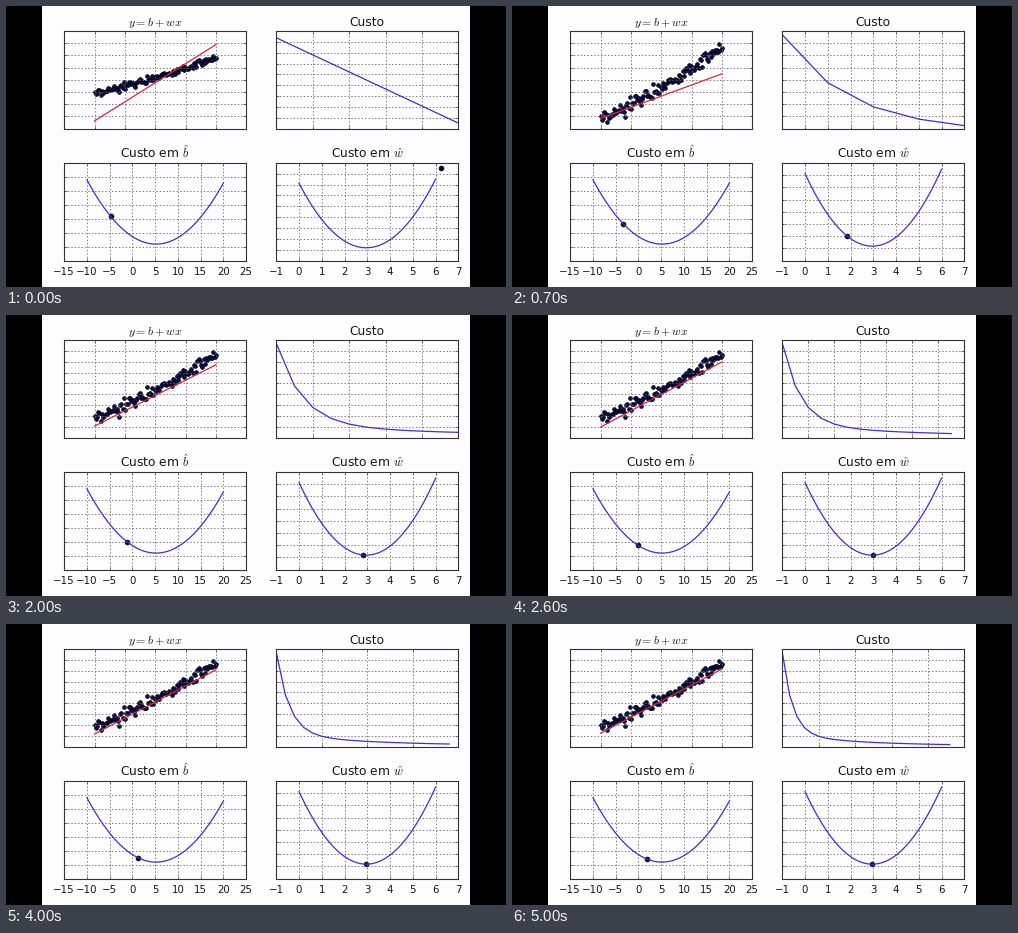
These frames come from a looping animation (500x281 px, 5.1 s). A matplotlib script:

```python
import math

import matplotlib.pyplot as plt
import numpy as np
from matplotlib.animation import FuncAnimation
from matplotlib.patches import Rectangle

W, H, DPI = 500, 281, 100
FRAMES, INTERVAL = 51, 100
STEP_MS, LEAD_MS = 225, 112     # pace of the descent and its head start
PX = 72 / DPI                   # one pixel in points

PAPER, INK, GRID = "#fdfcfe", "#161616", "#6a6a6a"
BLUE, RED, NAVY, BLACK = "#3c32cc", "#d6283c", "#0c0c5a", "#06060e"

plt.rcParams.update({
    "font.family": "DejaVu Sans",
    "mathtext.fontset": "cm",
    "lines.scale_dashes": False,
    "axes.axisbelow": "line",
    "axes.facecolor": PAPER,
    "axes.edgecolor": "#333333",
    "text.color": INK,
})

# Noisy line and its least-squares fit
np.random.seed(0)
x = np.linspace(-10, 10, 100)
y = 5 + 3 * x + np.random.normal(0, 3, 100)
w_best, b_best = np.polyfit(x, y, 1)


def cost(b, w):
    return np.mean((b + w * x - y) ** 2)


def descend(b, w, steps, rate=0.025):
    path = [(b, w)]
    for _ in range(steps):
        err = b + w * x - y
        b -= 2 * rate * np.mean(err)
        w -= 2 * rate * np.mean(err * x)
        path.append((b, w))
    return path


path = descend(-5.3, -1.74, 25)
costs = [cost(b, w) for b, w in path]


def round_ticks(lo, hi, bins=9):
    """Ticks at round numbers that enclose lo..hi in at most `bins` steps."""
    raw = (hi - lo) / bins
    mag = 10.0 ** math.floor(math.log10(raw))
    for size in (1, 2, 5, 10, 20):
        step = size * mag
        first = math.floor(lo / step)
        if step >= raw and (first + bins) * step >= hi:
            break
    return np.arange(first, math.ceil(hi / step) + 1) * step


def padded(*values):
    data = np.concatenate([np.ravel(v) for v in values])
    lo, hi = data.min(), data.max()
    pad = 0.05 * (hi - lo)
    return round_ticks(lo - pad, hi + pad)


def set_x(ax, ticks):
    ax.set_xticks(ticks)
    ax.set_xlim(ticks[0], ticks[-1])


def set_y(ax, ticks):
    ax.set_yticks(ticks)
    ax.set_ylim(ticks[0], ticks[-1])


fig = plt.figure(figsize=(W / DPI, H / DPI), dpi=DPI, facecolor="black")
fig.add_artist(Rectangle((36 / W, 0), 428 / W, 1, color=PAPER, lw=0, zorder=-1))


def write(px, py, text, size):
    fig.text(px / W, 1 - py / H, text, fontsize=size * PX,
             ha="center", va="baseline")


def panel(left, top, title, size=12.2):
    width, height = 182, 97.7
    ax = fig.add_axes([left / W, 1 - (top + height) / H, width / W, height / H])
    ax.grid(True, color=GRID, lw=0.85 * PX, linestyle=(0, (1.4 * PX, 2 * PX)))
    ax.tick_params(direction="in", top=True, right=True, length=3.3 * PX,
                   width=0.6 * PX, color="#333333",
                   labelbottom=False, labelleft=False)
    for spine in ax.spines.values():
        spine.set_linewidth(1.1 * PX)
    write(left + width / 2 - 0.4, top - 5, title, size)
    return ax


def label_x(ax, left, ticks):
    set_x(ax, ticks)
    for i, t in enumerate(ticks):
        text = f"{t:.0f}".replace("-", "\u2212")
        write(left + 182 * i / (len(ticks) - 1), 268.7, text, 10.2)


def curve(ax, color, xs=(), ys=()):
    return ax.plot(xs, ys, color=color, lw=1.25 * PX)[0]


def dots(ax, xs, ys, size, face):
    return ax.scatter(xs, ys, s=(size * PX) ** 2, c=face,
                      edgecolors=BLACK, linewidths=0.8 * PX)


LEFT, RIGHT, TOP, LOW = 58.2, 270.3, 25, 156.9
fit_ax = panel(LEFT, TOP, "$y=b+wx$", 11.9)
cost_ax = panel(RIGHT, TOP, "Custo")
b_ax = panel(LEFT, LOW, r"Custo em $\hat{b}$")
w_ax = panel(RIGHT, LOW, r"Custo em $\hat{w}$")

dots(fit_ax, x, y, 3.7, NAVY)
fit_line = curve(fit_ax, RED)
cost_line = curve(cost_ax, BLUE)

bs = np.linspace(-10, 20, 50)
ws = np.linspace(0, 6, 50)
b_costs = [cost(b, w_best) for b in bs]
w_costs = [cost(b_best, w) for w in ws]
curve(b_ax, BLUE, bs, b_costs)
curve(w_ax, BLUE, ws, w_costs)
b_dot = dots(b_ax, [0], [0], 4.8, BLACK)
w_dot = dots(w_ax, [0], [0], 4.8, BLACK)

set_x(fit_ax, padded(x))
label_x(b_ax, LEFT, padded(bs))
label_x(w_ax, RIGHT, padded(ws))


def update(frame):
    n = 1 + (frame * INTERVAL + LEAD_MS) // STEP_MS
    b, w = path[n]

    fit = b + w * x
    fit_line.set_data(x, fit)
    set_y(fit_ax, padded(y, fit))

    cost_line.set_data(range(n + 1), costs[:n + 1])
    set_x(cost_ax, round_ticks(0, n))
    set_y(cost_ax, round_ticks(min(costs[:n + 1]), costs[0]))

    b_cost, w_cost = cost(b, w_best), cost(b_best, w)
    b_dot.set_offsets([(b, b_cost)])
    w_dot.set_offsets([(w, w_cost)])
    set_y(b_ax, padded(b_costs, b_cost))
    set_y(w_ax, padded(w_costs, w_cost))
    return fit_line, cost_line, b_dot, w_dot


anim = FuncAnimation(fig, update, frames=FRAMES, interval=INTERVAL,
                     init_func=lambda: update(0), repeat=True, repeat_delay=0)
plt.show()
```
